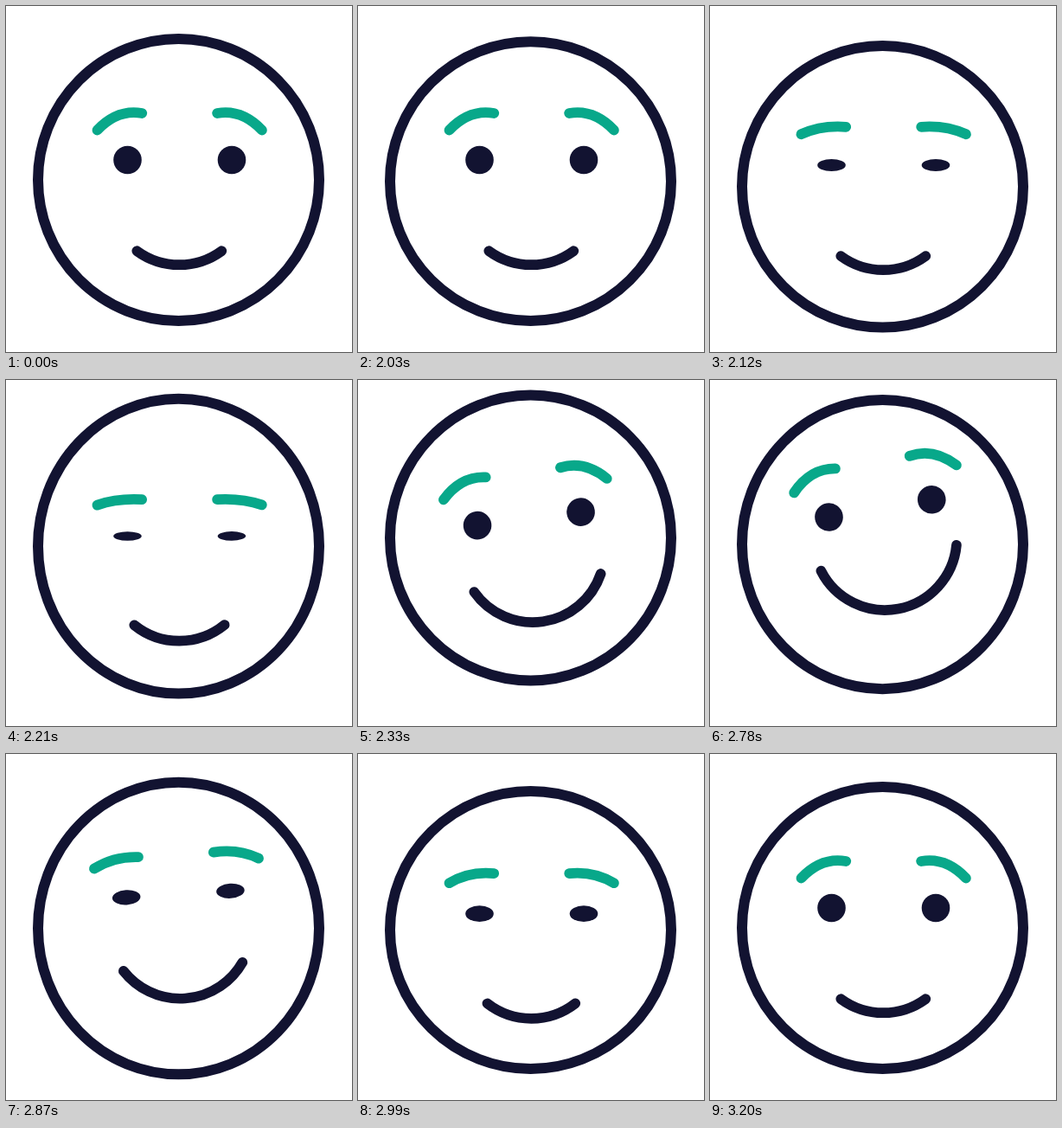
An HTML page that plays this animation: 400 by 400 pixels, repeating every 3830 ms.

```html
<!DOCTYPE html>
<html lang="en">
<head>
<meta charset="utf-8">
<title>Hopping smile</title>
<style>
  html, body { margin: 0; width: 100%; height: 100%; overflow: hidden; background: #fff; }
  svg { display: block; width: 100%; height: 100%; }
  .line { fill: none; stroke: #121331; stroke-width: 12; stroke-linecap: round; }
  #brows { stroke: #08a88a; stroke-width: 11.8; }
  #mouth { stroke-width: 11.7; }
  .eye { fill: #121331; }
</style>
</head>
<body>
<svg viewBox="0 0 400 400">
  <ellipse id="head" class="line" cx="199.5" rx="162.5"/>
  <g id="face">
    <path id="brows" class="line"/>
    <ellipse class="eye" cx="140.5" cy="178" rx="16.3"/>
    <ellipse class="eye" cx="261" cy="178" rx="16.3"/>
    <path id="mouth" class="line"/>
  </g>
</svg>
<script>
const LOOP = 3830, START = 2000, END = 1200, STEP = 30;
const [head, face, brows, mouth] = ['head', 'face', 'brows', 'mouth'].map(id => document.getElementById(id));
const eyes = document.querySelectorAll('.eye');

const clamp = (v, lo, hi) => Math.min(hi, Math.max(lo, v));

// Eased step from 0 to 1 between two times.
function ramp(t, from, to) {
  const u = clamp((t - from) / (to - from), 0, 1);
  return u * u * (3 - 2 * u);
}

// Rises to 1 during the first span and returns to 0 during the second.
const hold = (t, up0, up1, down0, down1) => ramp(t, up0, up1) - ramp(t, down0, down1);

// Single hump of height 1 around a centre time.
function bump(t, centre, width) {
  const u = clamp((t - centre) / width, -1, 1);
  return (1 + Math.cos(Math.PI * u)) / 2;
}

function drawHead(t) {
  // The top leads on take-off, the bottom leads on landing: squash and stretch.
  const top = 38 - 20.4 * hold(t, 90, 260, 690, 960)
    + 13 * bump(t, 90, 90) + 5.3 * bump(t, 975, 100) - 2 * bump(t, 1110, 90);
  const bottom = 364 - 20.4 * hold(t, 150, 400, 670, 850)
    + 8 * bump(t, 135, 105) + 7 * bump(t, 890, 100);
  head.setAttribute('cy', (top + bottom) / 2);
  head.setAttribute('ry', (bottom - top) / 2);
}

function drawFace(t) {
  const shift = -30.5 * hold(t, 180, 450, 760, 1000) + 7 * bump(t, 150, 120) + 6.8 * bump(t, 990, 165);
  const tilt = -13.9 * hold(t, 200, 450, 670, 970);
  face.setAttribute('transform', `translate(0 ${shift}) rotate(${tilt} 200.5 201)`);

  const open = 1 - 0.9 * (bump(t, 170, 120) + bump(t, 928, 120));
  eyes.forEach(eye => eye.setAttribute('ry', 16.3 * open));
  const y = v => 141.3 + open * (v - 141.3);
  const brow = x => `M${x(95.2)} ${y(143.5)}Q${x(72)} ${y(119)} ${x(43.5)} ${y(124)}`;
  brows.setAttribute('d', brow(x => 200.7 - x) + brow(x => 200.7 + x));

  // The smile grows along a circle of fixed radius.
  const smile = hold(t, 165, 480, 660, 1030);
  const r = 83, half = 36.2 + 50 * smile, lean = 1.5 * smile;
  const point = deg => {
    const a = deg * Math.PI / 180;
    return `${200.3 + r * Math.sin(a)} ${216.2 - 7.5 * smile ** 3 + r * Math.cos(a)}`;
  };
  mouth.setAttribute('d', `M${point(lean - half)}A${r} ${r} 0 0 0 ${point(lean + half)}`);
}

function tick() {
  const elapsed = performance.now() % LOOP - START;
  const t = clamp(Math.floor(elapsed / STEP) * STEP, 0, END);
  drawHead(t);
  drawFace(t);
  requestAnimationFrame(tick);
}
tick();
</script>
</body>
</html>
```
